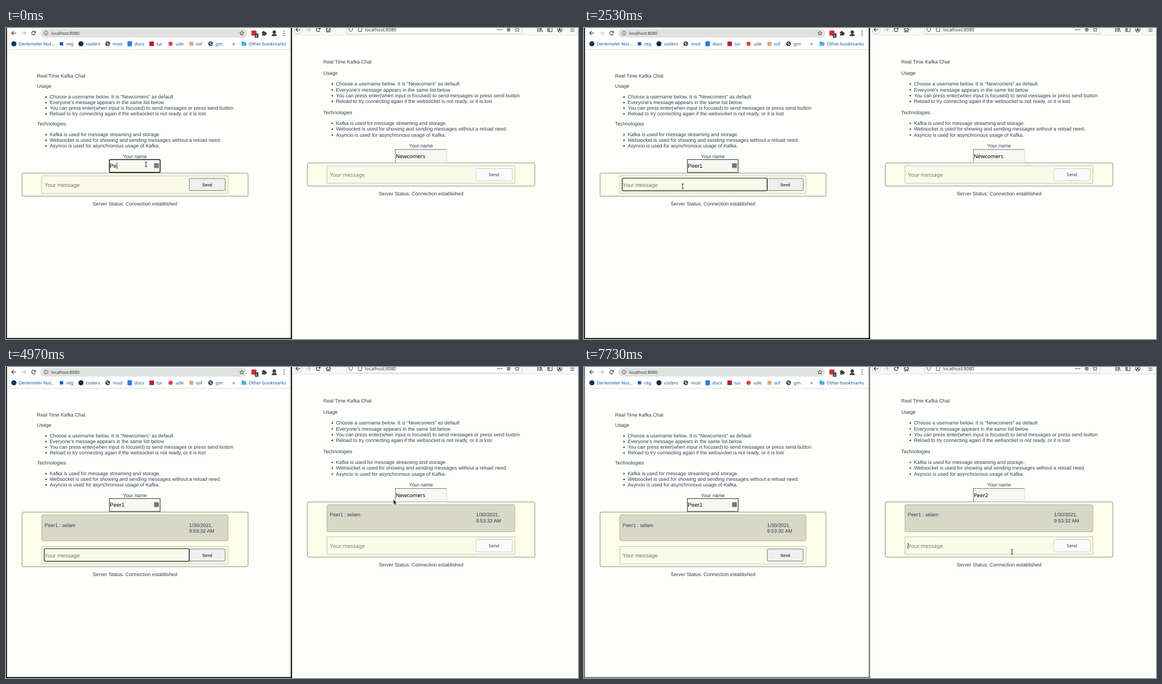
An HTML page with a canvas that plays this animation: 1015x552 px, repeating every 8 s.

```html
<!DOCTYPE html>
<html lang="en">
<head>
<meta charset="utf-8">
<title>Real Time Kafka Chat</title>
<style>
html, body { margin: 0; width: 100%; height: 100%; overflow: hidden; background: #fefffb; }
canvas { display: block; width: 100vw; height: 100vh; }
</style>
</head>
<body>
<canvas id="stage" width="1015" height="552"></canvas>
<script>
const ctx = document.getElementById('stage').getContext('2d');
const LOOP = 8000;
const SANS = '"Liberation Sans", Arial, sans-serif';
const UI = '"Noto Sans", "Open Sans", sans-serif';
const INK = '#2c3e50';
const ICON = '#3c4043';
const PAGE = '#fefffb';

const T = { focusMsg: 1600, sent: 4030, shown: 4200, blur: 5030, select: 5330, retype: 5870, rightMsg: 7700 };
const leftName = [[0, 'Pe'], [30, 'Pee'], [130, 'Peer'], [470, 'Peer1']];
const leftMsg = [[0, ''], [1970, 's'], [2530, ''], [2830, 's'], [3000, 'se'], [3100, 'sel'], [3200, 'sela'], [3800, 'selam'], [T.sent, '']];
const rightName = [[0, 'Newcomers'], [T.retype, 'P'], [6070, 'Pe'], [6280, 'Pee'], [6470, 'Peer'], [6530, 'Peer2']];

// Pointer path: time, x, y
const path = [
  [0, 248.5, 242], [740, 248.5, 242], [770, 285, 250], [900, 379, 257], [1069, 379, 257],
  [1070, 644, 228], [1130, 622, 236], [1330, 380, 279], [1450, 230, 292], [1530, 184, 288], [1600, 175, 281],
  [4569, 175, 281], [4570, 380, 281], [4769, 380, 281], [4770, 440, 270], [4930, 660, 240], [5030, 729, 231],
  [6770, 729, 231], [6800, 742, 237], [7000, 815, 272], [7180, 855, 308], [7400, 815, 334], [7600, 763, 337],
  [7690, 763, 337], [7700, 761, 331], [7730, 759.5, 328]
];

const usage = [
  'Choose a username below. It is "Newcomers" as default',
  "Everyone's message appears in the same list below",
  'You can press enter(when input is focused) to send messages or press send button',
  'Reload to try connecting again if the websocket is not ready, or it is lost'
];
const tech = [
  'Kafka is used for message streaming and storage.',
  'Websocket is used for showing and sending messages without a reload need.',
  'Asyncio is used for asynchronous usage of Kafka.'
];

// Both windows show the same page with slightly different metrics
const leftPage = {
  x: 55, mid: 228.8, title: 84.5, usage: 103.3, list: 122, tech: 170.3, techList: 189, pitch: 10, label: 227.5,
  box: [28.5, 257.5, 401, 41], form: [63.5, 262.5, 330.5, 31], msg: [63.5, 262.5, 330.5, 46],
  grow: 56, msgY: 280.5, timeX: 325, status: 312.3
};
const rightPage = {
  x: 563, mid: 736.5, title: 60.3, usage: 79.6, list: 99, tech: 149.6, techList: 168.9, pitch: 10.35, label: 209,
  box: [534.5, 239.5, 404, 41], form: [569.5, 244.5, 333.5, 31], msg: [569.5, 244.5, 333.5, 48],
  grow: 57, msgY: 262.3, timeX: 834, status: 294.3
};

// y is the middle of the capitals
function text(s, x, y, { size = 8.83, font = SANS, color = INK, align = 'left', weight = 400 } = {}) {
  ctx.font = `${weight} ${size}px ${font}`;
  ctx.fillStyle = color;
  ctx.textAlign = align;
  ctx.fillText(s, x, y + size * 0.36);
  return ctx.measureText(s).width;
}

function rect(x, y, w, h, color) {
  ctx.fillStyle = color;
  ctx.fillRect(x, y, w, h);
}

function box(x, y, w, h, r, fill, stroke, width = 1) {
  ctx.beginPath();
  ctx.roundRect(x, y, w, h, r);
  if (fill) { ctx.fillStyle = fill; ctx.fill(); }
  if (stroke) { ctx.strokeStyle = stroke; ctx.lineWidth = width; ctx.stroke(); }
}

function dot(x, y, r, fill) {
  ctx.fillStyle = fill;
  ctx.beginPath();
  ctx.arc(x, y, r, 0, 7);
  ctx.fill();
}

function ring(x, y, r, color, width = 1, from = 0, to = 2 * Math.PI) {
  ctx.beginPath();
  ctx.arc(x, y, r, from, to);
  ctx.strokeStyle = color;
  ctx.lineWidth = width;
  ctx.stroke();
}

function line(pts, color, width = 1) {
  ctx.beginPath();
  pts.forEach(([x, y]) => ctx.lineTo(x, y));
  ctx.strokeStyle = color;
  ctx.lineWidth = width;
  ctx.stroke();
}

function arrowIcon(x, y, dir, color) {
  line([[x - 3.8 * dir, y], [x + 3.8 * dir, y]], color, 1.2);
  line([[x + 0.4 * dir, y - 3.6], [x + 4 * dir, y], [x + 0.4 * dir, y + 3.6]], color, 1.2);
}

function reloadIcon(x, y) {
  ring(x, y, 3.3, ICON, 1.2, 0.5, 5.5);
  ctx.fillStyle = ICON;
  ctx.beginPath();
  ctx.moveTo(x + 4, y - 4);
  ctx.lineTo(x + 4, y - 0.3);
  ctx.lineTo(x + 0.4, y - 0.3);
  ctx.fill();
}

function star(x, y, r) {
  const pts = Array.from({ length: 11 }, (_, i) => {
    const a = i * Math.PI / 5 - Math.PI / 2, d = i % 2 ? r * 0.45 : r;
    return [x + d * Math.cos(a), y + d * Math.sin(a)];
  });
  line(pts, ICON, 0.9);
}

function globe(x, y) {
  dot(x, y, 4.2, '#353a40');
  line([[x - 2.7, y - 1.5], [x - 0.5, y - 0.6], [x + 0.8, y - 2.8]], '#fff', 1.1);
  line([[x - 1, y + 2.9], [x + 0.6, y + 0.8], [x + 2.9, y + 1]], '#fff', 1.1);
}

function person(x, y) {
  rect(x - 4.5, y - 5, 9, 10.5, '#f4efed');
  dot(x, y - 1.8, 2.9, '#3a3335');
  ctx.beginPath();
  ctx.ellipse(x, y + 5.3, 4.5, 3.7, 0, Math.PI, 2 * Math.PI);
  ctx.fill();
}

function leftChrome() {
  rect(0, 0, 507, 38, '#fff');
  arrowIcon(14, 9, -1, ICON);
  arrowIcon(31, 9, 1, '#b9bbbe');
  reloadIcon(49, 9);
  box(61, 1.5, 367, 15.5, 7.7, '#e0e2e1');
  ring(71, 9, 3.6, '#5f6368', 0.9);
  rect(70.5, 8.4, 1, 2.8, '#5f6368');
  rect(70.5, 6.7, 1, 1, '#5f6368');
  text('localhost:8080', 80, 9.2, { size: 7.4, font: UI, color: '#303338' });
  star(418.5, 9.3, 4);
  box(435.5, 4.5, 9, 9, 1, '#d32d27');
  box(441.5, 9.5, 6.5, 8, 1, '#45484c');
  text('1', 444.7, 13.6, { size: 6, color: '#fff', align: 'center' });
  rect(454, 7, 7, 6.3, ICON);
  dot(457.3, 6.5, 1.6, ICON);
  dot(461.2, 9.9, 1.6, ICON);
  dot(454, 10.2, 1.2, '#fff');
  person(476, 9);
  [5.3, 9.2, 13.1].forEach(y => dot(493.5, y, 1, ICON));

  const marks = [['Derlemeler Not…', 22.5], ['reg', 107], ['coders', 142], ['mod', 189.5], ['docs', 228],
    ['tur', 267], ['ude', 301], ['sof', 337], ['gm', 372], ['Other bookmarks', 431]];
  marks.forEach(([s, x]) => text(s, x, 28, { size: 7.95, font: UI, color: '#0f5590', weight: 500 }));
  dot(14, 28, 4.6, '#17395c');
  box(95.5, 25, 6, 6, 0, '#1b5fbf');
  dot(133, 28, 4.5, '#24292e');
  globe(180.5, 28);
  box(215.5, 23.5, 8, 9, 1, '#2c7de0');
  box(254.5, 24, 8, 8, 0, '#b3202f');
  dot(292, 28, 3.7, '#e5413f');
  box(325.5, 24.5, 7, 7, 0, '#d9a878');
  globe(363, 28);
  text('»', 401.5, 27.4, { size: 9, font: UI, color: ICON });
  box(418, 24, 4, 3, 0.7, '#4299c5');
  box(418, 25.2, 8.5, 6.3, 0.7, '#4fafd7');
  rect(0, 37.5, 507, 1, '#d9dadb');
}

function rightChrome() {
  rect(508, 0, 507, 12, '#f8f8f8');
  rect(508, 12, 507, 1, '#e5e5e2');
  ring(518.5, 3, 7.3, '#c4c4c4', 0.9);
  arrowIcon(518.5, 3, -1, ICON);
  arrowIcon(536, 3, 1, '#b9bbbe');
  reloadIcon(554, 3);
  line([[567.5, 3], [572, -1], [576.5, 3]], ICON, 1.2);
  line([[569, 2.5], [569, 7], [571, 7], [571, 4], [573, 4], [573, 7], [575, 7], [575, 2.5]], ICON, 1.1);
  box(604.5, -5, 311, 15.5, 1.5, '#fff', '#cfcfcf');
  line([[608.5, 0], [608.5, 3], [611.7, 7], [615, 3], [615, 0]], ICON, 1);
  box(625.2, -2, 6, 8.5, 1, null, ICON);
  text('localhost:8080', 637, 3.4, { size: 8.2, font: UI, color: '#303338' });
  [873, 876.3, 879.6].forEach(x => dot(x, 3, 1, ICON));
  dot(892, 3, 3.5, '#8b8b8e');
  star(907, 3, 4.2);
  [943.5, 946, 948.5].forEach(x => line([[x, -1], [x, 7]], ICON, 1.1));
  line([[949.3, 0], [951.8, 7]], ICON, 1.1);
  box(961, -1, 8, 7.5, 1, null, ICON);
  rect(962, 0, 3, 5.5, '#87898c');
  ring(982.5, 3, 4.2, ICON);
  dot(982.5, 2, 1.6, ICON);
  ring(982.5, 6.2, 2.5, ICON, 1.4, Math.PI, 2 * Math.PI);
  [0, 3, 6].forEach(y => rect(1001.5, y - 0.5, 7, 1, ICON));
}

function list(items, x, y, pitch) {
  items.forEach((s, i) => {
    dot(x + 16, y + i * pitch + 0.4, 1.35, INK);
    text(s, x + 22.4, y + i * pitch);
  });
}

function page(p, grown) {
  text('Real Time Kafka Chat', p.x, p.title);
  text('Usage', p.x, p.usage);
  list(usage, p.x, p.list, p.pitch);
  text('Technologies', p.x, p.tech);
  list(tech, p.x, p.techList, p.pitch);
  text('Your name', p.mid, p.label, { align: 'center' });

  const dy = grown ? p.grow : 0;
  let [x, y, w, h] = p.box;
  box(x, y, w, h + dy, 2.5, '#fdffe9', '#8f9288');
  [x, y, w, h] = p.form;
  box(x, y + dy, w, h, 0.5, '#fafaea', '#bccbab');
  if (grown) {
    box(...p.msg, 2.5, '#d7d8c7', '#b0b3a0');
    text('Peer1 : selam', p.form[0] + 5, p.msgY);
    text('1/30/2021,', p.timeX, p.msgY);
    text('9:53:32 AM', p.timeX, p.msgY + p.pitch);
  }
  text('Server Status: Connection established', p.mid, p.status + dy, { align: 'center' });
  return dy;
}

function at(steps, t) {
  return steps.filter(s => s[0] <= t).pop()[1];
}

function caret(x, y, h = 11) {
  rect(x, y - h / 2, 0.9, h, '#222');
}

function leftInputs(t, dy) {
  const focusName = t < T.focusMsg;
  const focusMsg = !focusName && t < T.blur;
  box(183.5, 233.5, 90, 22.8, focusName ? 1.5 : 0, '#f8f8f3', focusName ? '#161616' : '#383838', focusName ? 1.5 : 1.1);
  const nameW = text(at(leftName, t), 184.3, 244.6, { size: 9.85, color: '#000' });
  if (focusName) caret(184.5 + nameW, 244.5);
  box(262.7, 240, 8.6, 8.6, 1.2, '#77797a');

  const y = 278 + dy;
  box(325.3, y - 11, 63.7, 21.5, 1.8, '#efefef', '#777');
  text('Send', 357, y, { size: 7.5, color: '#000', align: 'center' });
  if (focusMsg) box(67.8, y - 11.5, 257.2, 22.4, 1.5, '#fafaea', '#1a1a1a', 1.2);
  const typed = at(leftMsg, t);
  const w = text(typed || 'Your message', 68.3, y, { size: 9.85, color: typed ? '#000' : '#757570' });
  if (focusMsg && typed) caret(68.5 + w, y);
}

function rightInputs(t, dy) {
  rect(690.5, 215, 92, 24.5, '#d9dad5');
  rect(690.5, 215, 91, 1.3, '#858783');
  rect(690.5, 215, 1.2, 24, '#858783');
  rect(691.7, 216.3, 89.8, 22.2, '#f8f8f3');
  const selected = t >= T.select && t < T.retype;
  if (selected) rect(691.5, 221, 53.3, 12.7, '#d8472f');
  const w = text(at(rightName, t), 691.7, 227.6, { size: 9.4, font: UI, color: selected ? '#fff' : '#000', weight: 500 });
  if (t >= T.retype && t < 6800) caret(692 + w, 227.3);

  const y = 260.3 + dy;
  box(833.8, y - 10.8, 64.5, 21.5, 1.8, '#fbfbfb', '#cdcdc8');
  text('Send', 866, y, { size: 7.8, font: UI, color: '#2e3436', align: 'center' });
  text('Your message', 575, y, { size: 9.35, font: UI, color: '#75756e' });
  if (t >= T.rightMsg) caret(574.5, y);
}

function pointerAt(t) {
  const i = path.findIndex(p => p[0] > t);
  if (i < 0) return path[path.length - 1].slice(1);
  const [t0, x0, y0] = path[i - 1], [t1, x1, y1] = path[i];
  const k = (t - t0) / (t1 - t0);
  return [x0 + (x1 - x0) * k, y0 + (y1 - y0) * k];
}

function pointer(t, dyL, dyR) {
  const [x, y] = pointerAt(t);
  const fields = [[183, 233, 91, 24], [68, 267 + dyL, 257, 22], [691, 215, 91, 24], [570, 245 + dyR, 264, 30]];
  if (fields.some(([fx, fy, w, h]) => x >= fx && x <= fx + w && y >= fy && y <= fy + h)) {
    line([[x, y - 3.5], [x, y + 3.5]], '#333', 1);
    [-4, 4].forEach(d => line([[x - 2.2, y + d], [x + 2.2, y + d]], '#333', 1));
    return;
  }
  const shape = [[0, 0], [0, 8.3], [1.9, 6.6], [3.2, 9.6], [4.5, 9], [3.2, 6.2], [5.7, 6]];
  ctx.beginPath();
  shape.forEach(([px, py]) => ctx.lineTo(x + px, y - 1 + py));
  ctx.closePath();
  ctx.strokeStyle = '#fff';
  ctx.lineWidth = 1.2;
  ctx.stroke();
  ctx.fillStyle = '#222';
  ctx.fill();
}

function windowFrame(color) {
  rect(0, 0, 1.7, 552, color);
  rect(505.3, 0, 2.2, 552, color);
  rect(0, 550.3, 507.5, 1.7, color);
}

function draw(now) {
  const t = now % LOOP;
  const grown = t >= T.shown;
  ctx.textRendering = 'geometricPrecision';
  rect(0, 0, 1015, 552, PAGE);
  leftChrome();
  rightChrome();
  const dyL = page(leftPage, grown);
  const dyR = page(rightPage, grown);
  leftInputs(t, dyL);
  rightInputs(t, dyR);
  windowFrame(t < T.blur ? '#0c0c0c' : '#6b6b6b');
  pointer(t, dyL, dyR);
}

let start;
function tick(now) {
  start ??= now;
  draw(now - start);
  requestAnimationFrame(tick);
}
requestAnimationFrame(tick);
</script>
</body>
</html>
```
